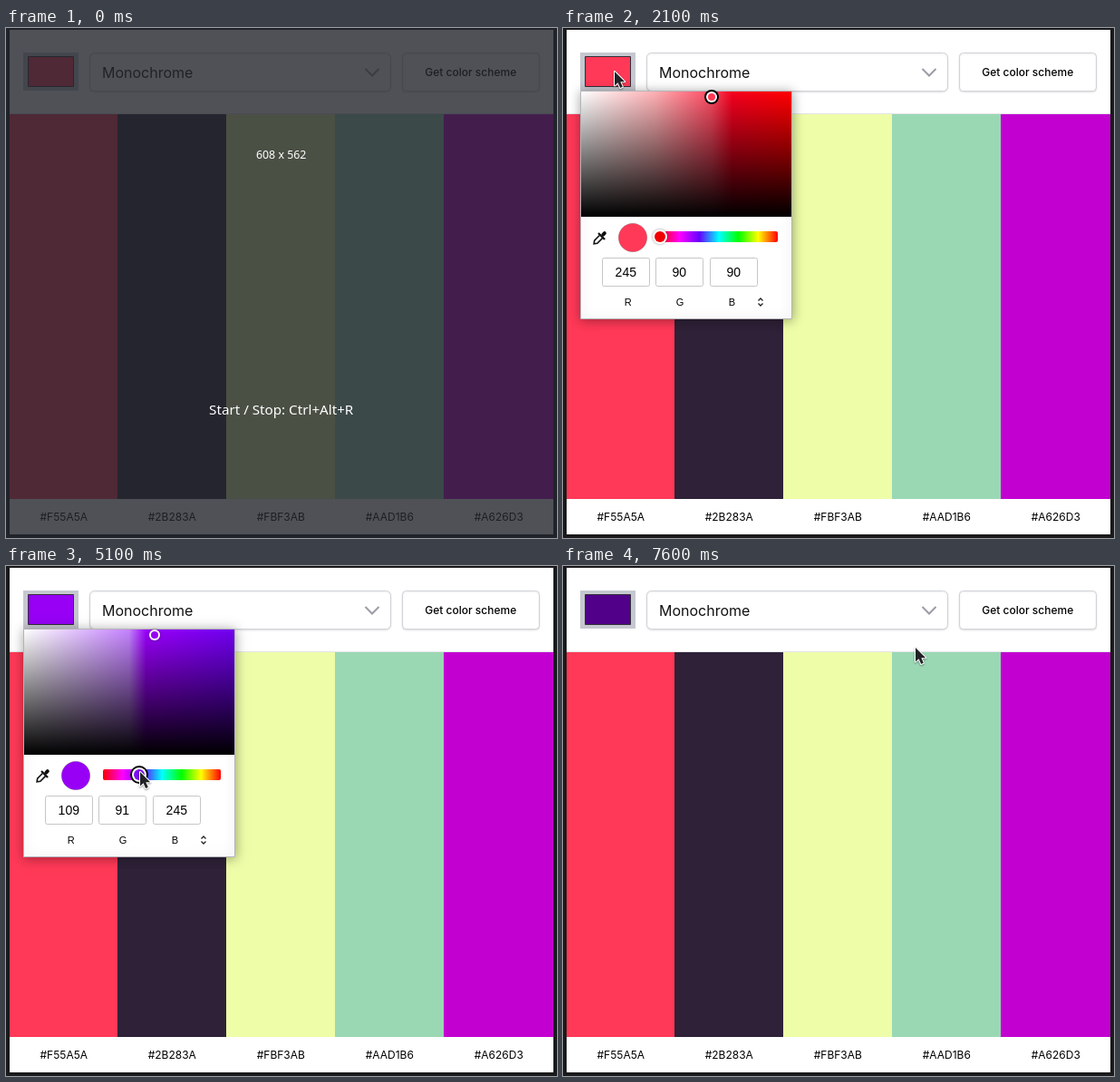
Animation, 608 px wide and 562 px high, one loop 8 s. Source, as an HTML page with a canvas:

```html
<!DOCTYPE html>
<html lang="en">
<head>
<meta charset="utf-8">
<title>Color scheme picker</title>
<style>
  html, body { margin: 0; width: 100%; height: 100%; overflow: hidden; background: #1a1a1c; }
  canvas { display: block; }
</style>
</head>
<body>
<canvas id="stage" width="608" height="562"></canvas>
<script>
const ctx = document.getElementById('stage').getContext('2d');
const LOOP = 8000;
const INTER = 'Inter, sans-serif', ARIAL = '"Liberation Sans", Arial, sans-serif', NOTO = '"Noto Sans", sans-serif';

const columns = [
  [4, '#ff3957', '#F55A5A'], [123, '#2e2138', '#2B283A'], [243, '#eefda8', '#FBF3AB'],
  [363, '#9ad8b4', '#AAD1B6'], [483, '#c200d0', '#A626D3'], [604]
];

const RED_FIELD = [[0, '#fff'], [.35, '#ffb0b4'], [.62, '#ff4a62'], [.72, '#f5001e'], [1, '#f00']];
const PURPLE_FIELD = [[0, '#fff'], [.5, '#c482ff'], [.58, '#9a00fa'], [1, '#7000f0']];
const HUES = ['#f00', '#f0f', '#60f', '#0ff', '#0f0', '#ff0', '#f00'].map((c, i) => [i / 6, c]);

// Picker states: start time, chosen color, RGB values, handle places and the focused handle
const states = [
  { at: 0, color: '#ff3957', rgb: [245, 90, 90], field: RED_FIELD, spot: [164, 76], hueX: 107, hue: '#f00000', focus: 'spot' },
  { at: 5100, color: '#9700f5', rgb: [109, 91, 245], field: PURPLE_FIELD, spot: [164, 76], hueX: 147, hue: '#7a10ee', focus: 'hue' },
  { at: 6100, color: '#500089', rgb: [52, 40, 143], field: PURPLE_FIELD, spot: [185, 131], hueX: 147, hue: '#7a10ee', focus: 'spot' }
];

// Pointer tip: time, x, y
const pointerPath = [
  [800, 65, 13], [1100, 63, 34], [1400, 61, 46], [1800, 61, 46], [1900, 57, 48],
  [2800, 57, 48], [3100, 78, 104], [3400, 138, 210], [3600, 148, 226], [3800, 148, 226],
  [3900, 147, 226], [4800, 147, 226], [4900, 148, 227], [5500, 148, 227],
  [5700, 168, 175], [5900, 187, 128], [6900, 187, 128], [7000, 235, 158],
  [7100, 350, 178], [7200, 472, 130], [7300, 425, 76], [7400, 389, 90]
];

function pointerAt(t) {
  const i = pointerPath.findIndex(p => p[0] > t);
  if (i < 0) return pointerPath[pointerPath.length - 1].slice(1);
  const [t0, x0, y0] = pointerPath[i - 1], [t1, x1, y1] = pointerPath[i];
  const k = (t - t0) / (t1 - t0);
  return [x0 + (x1 - x0) * k, y0 + (y1 - y0) * k].map(Math.round);
}

function rect(x, y, w, h, fill) {
  ctx.fillStyle = fill;
  ctx.fillRect(x, y, w, h);
}

function box(x, y, w, h, r, fill, stroke) {
  ctx.beginPath();
  ctx.roundRect(x + .5, y + .5, w - 1, h - 1, r);
  paint(fill, stroke, 1);
}

function paint(fill, stroke, width) {
  if (fill) { ctx.fillStyle = fill; ctx.fill(); }
  if (stroke) { ctx.strokeStyle = stroke; ctx.lineWidth = width; ctx.stroke(); }
}

function disc(x, y, r, fill) {
  ctx.beginPath();
  ctx.arc(x, y, r, 0, 7);
  paint(fill);
}

function line(points, stroke, width) {
  ctx.beginPath();
  points.forEach(p => ctx.lineTo(...p));
  paint(null, stroke, width);
}

function text(str, x, y, font, fill = '#000', align = 'center') {
  ctx.font = font;
  ctx.textAlign = align;
  ctx.fillStyle = fill;
  ctx.fillText(str, x, y);
}

function gradient(x0, y0, x1, y1, stops) {
  const g = ctx.createLinearGradient(x0, y0, x1, y1);
  stops.forEach(s => g.addColorStop(...s));
  return g;
}

function withShadow(color, blur, dy, draw) {
  ctx.save();
  ctx.shadowColor = color;
  ctx.shadowBlur = blur;
  ctx.shadowOffsetY = dy;
  draw();
  ctx.restore();
}

function drawPage(color) {
  rect(0, 0, 608, 562, '#1a1a1c');
  rect(4, 2, 600, 556, '#fff');
  rect(4, 94, 600, 1, '#e3e3e6');

  rect(19, 27, 61, 42, '#c6c8d0');
  box(24, 31, 51, 34, 0, color, '#33303a');

  withShadow('rgba(0,0,0,.1)', 2, 1, () => {
    box(92, 27, 333, 43, 5, '#fff', '#d1d3d9');
    box(437, 27, 152, 43, 4, '#fff', '#d1d3d9');
  });
  text('Monochrome', 106, 55, '16px ' + INTER, '#111', 'left');
  line([[396.5, 45], [404, 52.5], [411.5, 45]], '#9a9ca6', 2);
  text('Get color scheme', 512.7, 53, '500 12px ' + INTER);

  for (let i = 0; i < 5; i++) {
    const [x, fill, label] = columns[i], next = columns[i + 1][0];
    rect(x, 95, next - x, 424, fill);
    text('' + label, (x + next) / 2 + .3, 543, '12px ' + INTER);
  }
}

function drawHandle(x, y, r, fill, focused) {
  if (focused) disc(x, y, r + 2, '#000');
  withShadow('rgba(0,0,0,.4)', focused ? 0 : 3, 0, () => disc(x, y, r, '#fff'));
  disc(x, y, r - 2, fill);
}

function drawEyedropper() {
  ctx.save();
  ctx.translate(40.5, 231.5);
  ctx.rotate(Math.PI / 4);
  box(-2.5, -10, 5, 7, 2, '#111');
  rect(-5, -4, 10, 2.2, '#111');
  line([[-2.2, -2], [-2.2, 6], [0, 9], [2.2, 6], [2.2, -2]], '#111', 1.6);
  ctx.restore();
}

function drawPicker(s) {
  withShadow('rgba(0,0,0,.35)', 12, 1, () => box(19, 69, 234, 252, 0, '#fff', '#b4b4b8'));
  rect(20, 70, 232, 138, gradient(20, 0, 252, 0, s.field));
  rect(20, 70, 232, 138, gradient(0, 70, 0, 208, [[0, 'rgba(0,0,0,0)'], [1, '#000']]));

  drawEyedropper();
  disc(77, 231, 16, 'rgba(0,0,0,.35)');
  disc(77, 231, 15.6, s.color);
  ctx.beginPath();
  ctx.roundRect(107, 224, 130, 12, 2);
  paint(gradient(107, 0, 237, 0, HUES));

  drawHandle(s.hueX, 230, 8, s.hue, s.focus === 'hue');
  drawHandle(...s.spot, 6, s.color, s.focus === 'spot');

  [43, 102, 162].forEach((x, i) => {
    box(x, 253, 53, 32, 2, '#fff', '#c6c6c9');
    text(s.rgb[i], x + 26.3, 274, '14px ' + ARIAL);
    text('RGB'[i], 71.7 + 57.3 * i, 306, '11px ' + ARIAL);
  });
  line([[215.5, 300.5], [218, 298], [220.5, 300.5]], '#222', 1.3);
  line([[215.5, 303.5], [218, 306], [220.5, 303.5]], '#222', 1.3);
}

const arrow = new Path2D('M0 0V15.5L3.6 12.3 6.2 18 8.8 16.8 6.3 11.3H11.2Z');
const hand = new Path2D('M-1.6 1.2Q0 -1 1.6 1.2V6Q3.4 5 4.4 6.6Q6 5.8 6.8 7.4Q8.6 7 8.6 9V12Q8.4 14 7 16.5H-1.6Q-3 14 -6.2 10.2Q-6.2 7.6 -3.8 8.8L-1.6 10.6Z');

function drawPointer(t) {
  const [x, y] = pointerAt(t);
  const isHand = t < 1900 && y > 27;
  ctx.save();
  ctx.translate(x, y);
  ctx.lineJoin = 'round';
  ctx.lineWidth = isHand ? 1.2 : 2;
  ctx.strokeStyle = isHand ? '#111' : '#fff';
  ctx.fillStyle = isHand ? '#fff' : '#222226';
  const shape = isHand ? hand : arrow;
  withShadow('rgba(0,0,0,.4)', 2, 1, () => ctx.stroke(shape));
  ctx.fill(shape);
  if (isHand) line([[1.6, 6], [1.6, 9]], '#111', 1);
  ctx.restore();
}

function drawNotice() {
  rect(0, 0, 608, 562, 'rgba(36,38,46,.8)');
  text('608 x 562', 303.7, 144, '12.4px ' + NOTO, '#fff');
  text('Start / Stop: Ctrl+Alt+R', 303.7, 426, '15.2px ' + NOTO, '#fff');
}

function frame(now) {
  // The screen is sampled ten times a second
  const t = Math.floor(now % LOOP / 100) * 100;
  const state = states.filter(s => s.at <= t).pop();
  drawPage(state.color);
  if (t >= 2100 && t < 7600) drawPicker(state);
  if (t >= 800) drawPointer(t);
  if (t < 100) drawNotice();
  requestAnimationFrame(frame);
}

const start = performance.now();
requestAnimationFrame(() => frame(0));
function tick() { frame(performance.now() - start); }
</script>
<script>
// Run every frame from the time since the page loaded
frame = (draw => () => draw(performance.now() - start))(frame);
</script>
</body>
</html>
```
